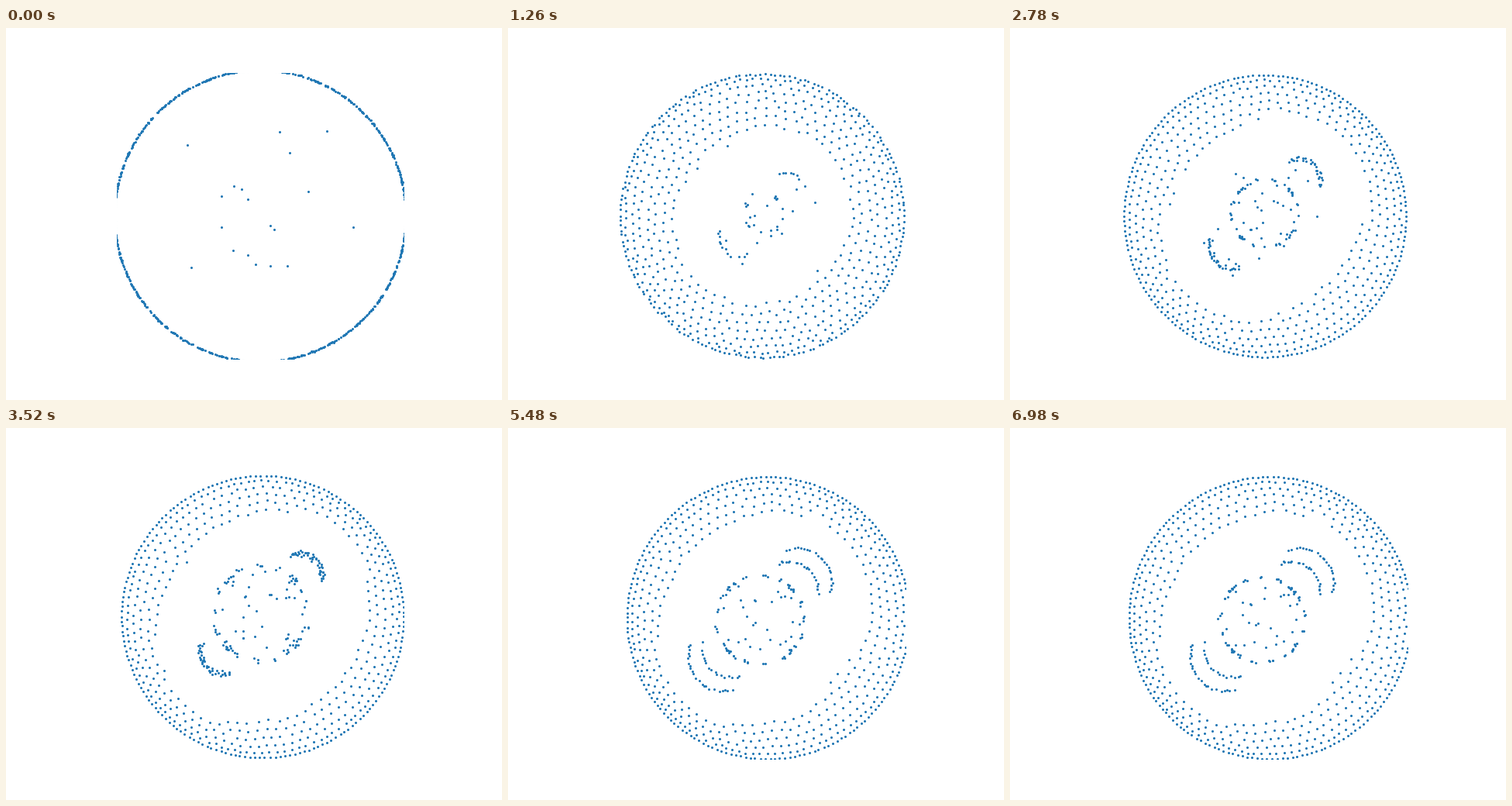
These frames come from a looping animation (640x480 px, 7000 ms). A matplotlib script:

```python
import numpy as np
import matplotlib.pyplot as plt
from matplotlib.animation import FuncAnimation

W, H, DPI = 640, 480, 100
STEPS = 150
R0 = 182
TILT = np.pi / 4
rng = np.random.default_rng(4)


def ramp(i, start, end):
    t = np.clip((i - start) / (end - start), 0, 1)
    return t * t * (3 - 2 * t)


def bump(i, centre, width):
    return np.exp(-((i - centre) / width) ** 2)


def blob(n):
    return rng.normal(size=n) + 1j * rng.normal(size=n)


def disc_layout():
    """Rows of dots inside the rim, pushed apart until evenly spaced."""
    pts, gaps = [], []
    d = 0
    while d < 84:
        gap = 12.6 - 6.2 * np.exp(-d / 9)
        n = int(2 * np.pi * (R0 - d) / gap)
        p = (R0 - d) * np.exp(2j * np.pi * (np.arange(n) + rng.random()) / n)
        pts.append(p + (2.5 * blob(n) if d else 0))
        gaps.append(np.full(n, gap))
        d += 0.82 * gap + 0.5
    rim = len(pts[0])
    p, g = np.concatenate(pts), np.concatenate(gaps)
    reach = (g[:, None] + g) / 2
    for _ in range(20):
        diff = p[:, None] - p
        dist = np.abs(diff) + 1e-6
        push = (np.clip(reach - dist, 0, None) / dist * diff).sum(1)
        p[rim:] += 0.2 * push[rim:]
        p *= np.minimum(1, R0 / np.abs(p))
    return R0 - np.abs(p), np.angle(p)


depth, ang = disc_layout()
N = len(depth)
rank = np.argsort(np.argsort(-depth))
u, v = rank * 0.7549 % 1, rank * 0.5698 % 1
spread = np.sqrt(rng.random(N))
noise, rough, jitter = blob(N), rng.normal(size=N), blob(N)
phase = rng.uniform(0, 2 * np.pi, N)

is_cap, is_stray = u < 0.45, u > 0.82
side = np.where(rank % 2, 1, -1)
layer = rank // 2 % 2


def core(i):
    """A broken ring with strays, between crescents on a tilted axis.
    Angles run counter-clockwise with y up."""
    late = ramp(i, 76, 118)
    blur = 50 * np.exp(-i / 4) + 10 * bump(i, 94, 12)
    ring = 25 + 30 * ramp(i, 36, 76) + 20 * bump(i, 94, 16)
    a = 2 * np.pi * v + 0.01 * i
    a += 0.2 * np.sin(4 * a)
    r = np.where(is_stray, ring * spread + 55 * bump(i, 13, 12), ring)
    z = r * np.exp(1j * a) + (0.8 + blur) * noise

    tip = 45 + 40 * ramp(i, 8, 41) + 27 * ramp(i, 41, 105)
    bend = 18 + 12 * ramp(i, 8, 41) + 15 * late
    inset = layer * (4 + 18 * late)
    curve = bend - inset / 3
    cap = (tip - inset - curve
           + curve * np.exp(1j * np.radians(130) * (v - 0.5)))
    cap = side * cap * np.exp(1j * TILT)
    cap = cap + (0.7 + (0.3 if i > 40 else 1) * blur) * noise
    z = np.where(is_cap, cap, z)
    return complex(329 - 4 * late, 239 + 8 * late) + z.conj()


def shell(i):
    """Positions in the outer band and which dots have broken loose."""
    drift = ramp(i, 40, 118)
    centre = complex(328 + 7.5 * drift, 242.3 + 2.7 * drift)
    rim = R0 + 6 * np.exp(-i / 4) + 1.5 * bump(i, 27, 6)
    hole = (102 + 31 * ramp(i, 13, 76)
            + 13 * ramp(i, 10, 40) * np.cos(2 * (ang - TILT))
            - 7 * ramp(i, 76, 118) * np.cos(ang))
    room = R0 - hole
    d = depth * (room / room.mean()) ** 0.6
    loose = d > room

    d = d + 14 * bump(i, 94, 9) * (d > room - 14)
    opened = 1 - np.exp(-i / 4)
    calm = np.exp(-i / 18)
    d = opened * np.abs(d + 4 * calm * rough) + 0.3 * (1 - opened) * rough
    sway = 0.004 * np.sin(i / 12 + phase) + 0.025 * calm * jitter.real
    return centre + (rim - d) * np.exp(-1j * (ang + sway)), loose


def build():
    frames, w = [], None
    for i in range(STEPS):
        outer, loose = shell(i)
        w = loose.astype(float) if w is None else w + 0.45 * (loose - w)
        frames.append(outer + w * (core(i) - outer))
    return frames


frames = build()
# Every three steps last 20, 100 and 20 ms.
order = np.repeat(np.arange(STEPS), np.tile([1, 5, 1], STEPS // 3))

fig = plt.figure(figsize=(W / DPI, H / DPI), dpi=DPI, facecolor="white")
size = 0.77 * H
left = 328 - size / 2
ax = fig.add_axes([left / W, 0.11, size / W, 0.77])
ax.set_xlim(left, left + size)
ax.set_ylim(0.89 * H, 0.12 * H)
ax.axis("off")
dots, = ax.plot([], [], "o", ms=1.2, color="#1f77b4")


def draw(k):
    z = frames[order[k]]
    dots.set_data(z.real, z.imag)
    return dots,


anim = FuncAnimation(fig, draw, frames=len(order), interval=20,
                     repeat=True, repeat_delay=0, blit=False)
plt.show()
```
